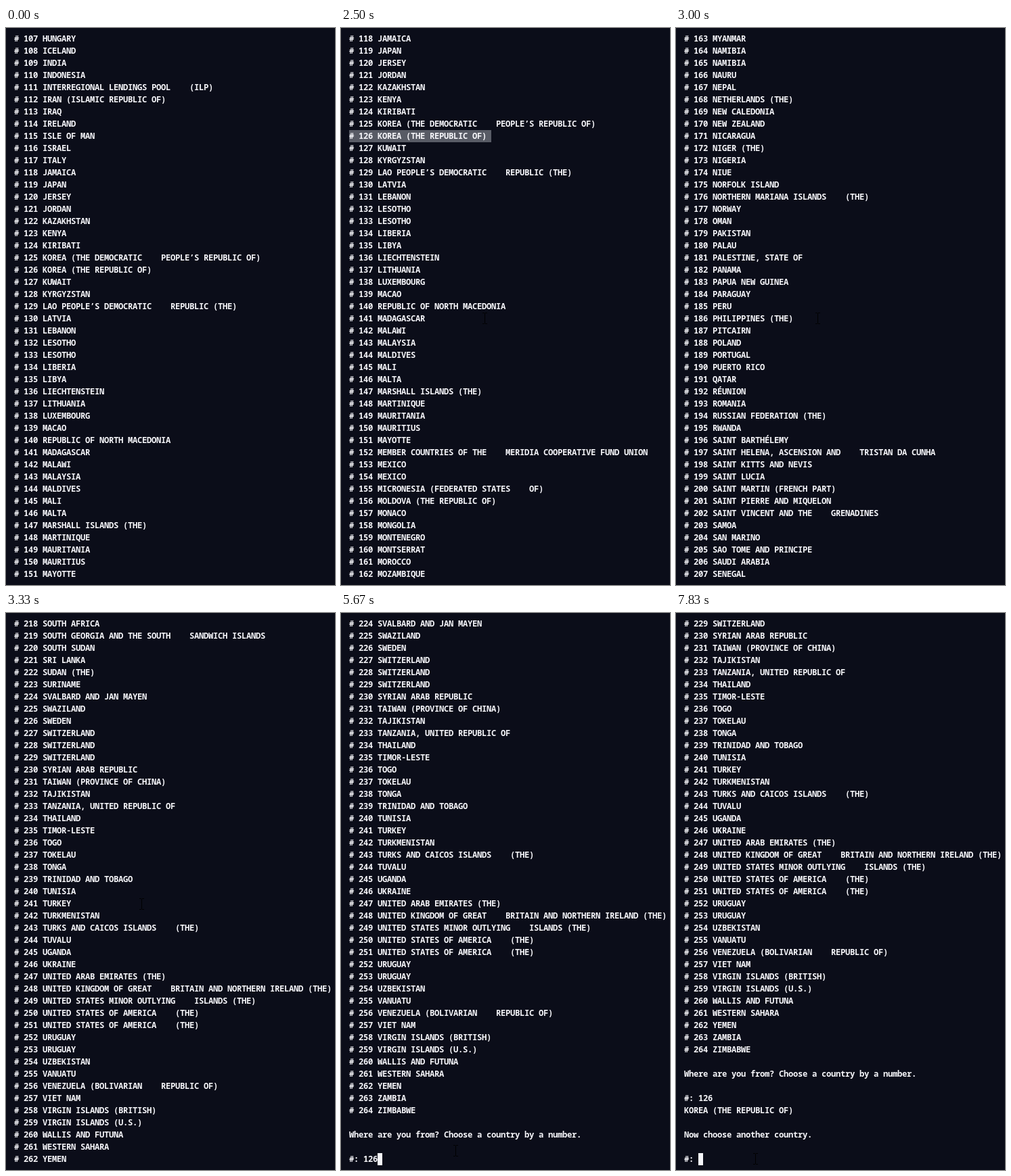
Write an HTML page with a canvas that moves like this. It is 486 px wide and 824 px high and loops after 8000 ms.

```html
<!DOCTYPE html>
<html lang="en">
<head>
<meta charset="utf-8">
<title>Country list</title>
<style>
html, body { margin: 0; width: 100%; height: 100%; overflow: hidden; background: #0b0d19; }
canvas { display: block; }
</style>
</head>
<body>
<canvas id="stage" width="486" height="824"></canvas>
<script>
const ctx = document.getElementById('stage').getContext('2d');
const W = 486, H = 824, LOOP = 8000, TICK = 1000 / 12;
const LEFT = 12, TOP = 7, CELL = 7, ROW = 18, ROWS = 45;
const BG = '#0b0d19', INK = '#f6f6fa', MARK = '#585b65';
const FONT = '600 12.2px "Noto Sans Mono", "DejaVu Sans Mono", monospace';

// "_" stands for the wide gap inside long names
const countries = `HUNGARY|ICELAND|INDIA|INDONESIA|INTERREGIONAL LENDINGS POOL_(ILP)
IRAN (ISLAMIC REPUBLIC OF)|IRAQ|IRELAND|ISLE OF MAN|ISRAEL|ITALY|JAMAICA|JAPAN|JERSEY|JORDAN
KAZAKHSTAN|KENYA|KIRIBATI|KOREA (THE DEMOCRATIC_PEOPLE’S REPUBLIC OF)|KOREA (THE REPUBLIC OF)
KUWAIT|KYRGYZSTAN|LAO PEOPLE’S DEMOCRATIC_REPUBLIC (THE)|LATVIA|LEBANON|LESOTHO|LESOTHO
LIBERIA|LIBYA|LIECHTENSTEIN|LITHUANIA|LUXEMBOURG|MACAO|REPUBLIC OF NORTH MACEDONIA|MADAGASCAR
MALAWI|MALAYSIA|MALDIVES|MALI|MALTA|MARSHALL ISLANDS (THE)|MARTINIQUE|MAURITANIA|MAURITIUS
MAYOTTE|MEMBER COUNTRIES OF THE_MERIDIA COOPERATIVE FUND UNION|MEXICO|MEXICO
MICRONESIA (FEDERATED STATES_OF)|MOLDOVA (THE REPUBLIC OF)|MONACO|MONGOLIA|MONTENEGRO
MONTSERRAT|MOROCCO|MOZAMBIQUE|MYANMAR|NAMIBIA|NAMIBIA|NAURU|NEPAL|NETHERLANDS (THE)
NEW CALEDONIA|NEW ZEALAND|NICARAGUA|NIGER (THE)|NIGERIA|NIUE|NORFOLK ISLAND
NORTHERN MARIANA ISLANDS_(THE)|NORWAY|OMAN|PAKISTAN|PALAU|PALESTINE, STATE OF|PANAMA
PAPUA NEW GUINEA|PARAGUAY|PERU|PHILIPPINES (THE)|PITCAIRN|POLAND|PORTUGAL|PUERTO RICO|QATAR
RÉUNION|ROMANIA|RUSSIAN FEDERATION (THE)|RWANDA|SAINT BARTHÉLEMY
SAINT HELENA, ASCENSION AND_TRISTAN DA CUNHA|SAINT KITTS AND NEVIS|SAINT LUCIA
SAINT MARTIN (FRENCH PART)|SAINT PIERRE AND MIQUELON|SAINT VINCENT AND THE_GRENADINES|SAMOA
SAN MARINO|SAO TOME AND PRINCIPE|SAUDI ARABIA|SENEGAL|SERBIA|SEYCHELLES|SIERRA LEONE|SINGAPORE
SINT MAARTEN (DUTCH PART)|SISTEMA COMUN DE_LIQUIDACIONES|SLOVAKIA|SLOVENIA|SOLOMON ISLANDS
SOMALIA|SOUTH AFRICA|SOUTH GEORGIA AND THE SOUTH_SANDWICH ISLANDS|SOUTH SUDAN|SRI LANKA
SUDAN (THE)|SURINAME|SVALBARD AND JAN MAYEN|SWAZILAND|SWEDEN|SWITZERLAND|SWITZERLAND
SWITZERLAND|SYRIAN ARAB REPUBLIC|TAIWAN (PROVINCE OF CHINA)|TAJIKISTAN
TANZANIA, UNITED REPUBLIC OF|THAILAND|TIMOR-LESTE|TOGO|TOKELAU|TONGA|TRINIDAD AND TOBAGO
TUNISIA|TURKEY|TURKMENISTAN|TURKS AND CAICOS ISLANDS_(THE)|TUVALU|UGANDA|UKRAINE
UNITED ARAB EMIRATES (THE)|UNITED KINGDOM OF GREAT_BRITAIN AND NORTHERN IRELAND (THE)
UNITED STATES MINOR OUTLYING_ISLANDS (THE)|UNITED STATES OF AMERICA_(THE)
UNITED STATES OF AMERICA_(THE)|URUGUAY|URUGUAY|UZBEKISTAN|VANUATU
VENEZUELA (BOLIVARIAN_REPUBLIC OF)|VIET NAM|VIRGIN ISLANDS (BRITISH)|VIRGIN ISLANDS (U.S.)
WALLIS AND FUTUNA|WESTERN SAHARA|YEMEN|ZAMBIA|ZIMBABWE`;

const list = countries.split(/[|\n]/)
  .map((name, i) => `# ${107 + i} ${name.replace('_', '    ')}`)
  .concat('', 'Where are you from? Choose a country by a number.', '');
const reply = ['KOREA (THE REPUBLIC OF)', '', 'Now choose another country.', '', '#: '];

// Keys are [tick, ...values], twelve ticks a second
const scroll = [[29, 0], [30, 11], [36, 56], [40, 111], [41, 111], [42, 117]];
const pointer = [
  [6, 130, 748], [14, 168, 378], [17, 8, 358], [22, 231, 357], [24, 211, 362],
  [26, 212, 380], [28, 212, 413], [30, 212, 429], [36, 209, 429], [40, 200, 430],
  [46, 190, 430], [48, 187, 520], [52, 182, 818], [54, 182, 818], [55, 176, 805],
  [56, 169, 795], [92, 169, 795], [94, 117, 807]
];
const DRAG_START = 17, DRAG_END = 22, ENTER = 79;
const PICKED = 19, PICKED_CELLS = 30;

function at(keys, tick) {
  const n = keys.findIndex(k => k[0] > tick);
  if (n < 0) return keys[keys.length - 1].slice(1);
  if (n === 0) return keys[0].slice(1);
  const a = keys[n - 1], b = keys[n];
  const p = (tick - a[0]) / (b[0] - a[0]);
  return a.slice(1).map((v, i) => v + (b[i + 1] - v) * p);
}

function typed(tick) {
  return tick < 62 ? '' : tick < 68 ? '12' : '126';
}

function selectedCells(tick) {
  if (tick < DRAG_START) return 0;
  if (tick >= DRAG_END) return PICKED_CELLS;
  const x = at(pointer, tick)[0];
  return Math.max(0, Math.min(PICKED_CELLS, Math.round((x - LEFT) / CELL)));
}

function cells(col, row, count, color) {
  ctx.fillStyle = color;
  ctx.fillRect(LEFT + col * CELL, TOP + row * ROW, count * CELL, ROW);
}

function drawPointer(px, py) {
  const x = Math.round(px), y = Math.round(py);
  ctx.fillStyle = '#000';
  ctx.fillRect(x, y - 7, 1, 15);
  for (const edge of [y - 8, y + 8]) {
    ctx.fillRect(x - 3, edge, 3, 1);
    ctx.fillRect(x + 1, edge, 3, 1);
  }
}

function draw(tick) {
  const done = tick >= ENTER;
  const lines = list.concat('#: ' + typed(tick), done ? reply : []);
  const last = lines.length - 1;
  const first = done ? lines.length - ROWS : Math.round(at(scroll, tick)[0]);

  ctx.fillStyle = BG;
  ctx.fillRect(0, 0, W, H);
  cells(0, PICKED - first, selectedCells(tick), MARK);

  ctx.font = FONT;
  ctx.letterSpacing = '0px';
  ctx.letterSpacing = CELL - ctx.measureText('0').width + 'px';
  ctx.fillStyle = INK;
  lines.slice(first, first + ROWS).forEach((line, i) => {
    ctx.fillText(line, LEFT, TOP + i * ROW + 13);
  });

  if (last < first + ROWS) cells(lines[last].length, last - first, 1, INK);
  if (tick >= pointer[0][0]) drawPointer(...at(pointer, tick));
}

const start = performance.now();
function frame() {
  const t = (performance.now() - start) % LOOP;
  draw(Math.floor((t + 4) / TICK) % 96);
  requestAnimationFrame(frame);
}
frame();
</script>
</body>
</html>
```
